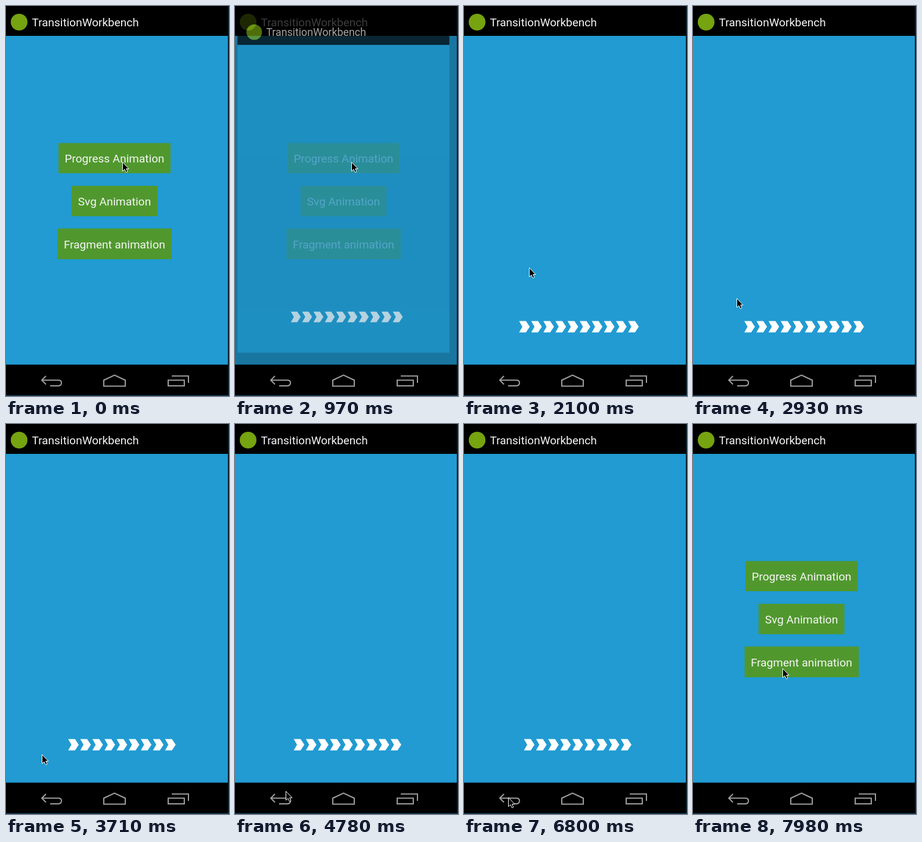
An HTML page that plays this animation: 374 px wide and 653 px high, repeating every 8000 ms.

```html
<!DOCTYPE html>
<html lang="en">
<head>
<meta charset="utf-8">
<title>TransitionWorkbench</title>
<style>
  html, body { margin: 0; height: 100%; overflow: hidden; background: #000; }
  svg { display: block; width: 100vw; height: 100vh; }
  text { font: 19px Roboto, sans-serif; fill: #f6f6f6; }
  .label { text-anchor: middle; }
  .icon { fill: none; stroke: #9d9d9d; stroke-width: 2; }
</style>
</head>
<body>
<svg viewBox="0 0 374 653">
  <defs>
    <g id="page">
      <path fill="#000" d="M-8-30H372V50H-8z"/>
      <path fill="#219bd2" d="M-8 50H372V601H-8z"/>
      <circle cx="22" cy="27" r="14" fill="#76a310"/>
      <text x="43.5" y="34">TransitionWorkbench</text>
    </g>
    <clipPath id="navClip"><path d="M0 601H372V651H0z"/></clipPath>
    <radialGradient id="halo">
      <stop offset=".86" stop-color="#fff"/>
      <stop offset=".88" stop-color="#fff" stop-opacity=".4"/>
      <stop offset="1" stop-color="#fff" stop-opacity="0"/>
    </radialGradient>
  </defs>

  <use href="#page"/>
  <g fill="#50982e">
    <path d="M88 229.500H276V280H88zM110 301H254V352H110zM86.500 372.500H278V424H86.500z"/>
    <text class="label" x="182" y="262">Progress Animation</text>
    <text class="label" x="182" y="334">Svg Animation</text>
    <text class="label" x="182" y="405.500">Fragment animation</text>
  </g>
  <path id="dim" d="M0 0H372V601H0z"/>

  <g id="front">
    <use href="#page"/>
    <g id="arrows" fill="#fff"></g>
  </g>

  <path d="M0 600.500H374V653H0z"/>
  <circle id="ripple" cx="77" cy="627" fill="url(#halo)" clip-path="url(#navClip)"/>
  <g class="icon" transform="translate(0 1)">
    <path id="back" d="M67 618.500L60 625.500L67 632.500M60 625.500H88Q93 625.500 93 630T88 635H74"/>
    <path d="M164 635.500V625.500L182 617L200 625.500V635.500z"/>
    <path d="M272 625.500H299V635H272zM278 618.500H306V630"/>
  </g>
  <path fill="#0a1e2a" d="M372 0H374V653H372z"/>
  <path fill="#123e55" d="M0 651.500H374V653H0z"/>
  <path id="cursor" d="M.5.5V15.500L4 12.500L6.500 17.700L9 16.500L6.700 11.500H11z" stroke="#fff" stroke-width="1"/>
</svg>

<script>
const LOOP = 8000, STEP = 59.4, PITCH = 20.32, SPEED = .0707;
const $ = id => document.getElementById(id);
const clamp = (v, lo, hi) => Math.min(Math.max(v, lo), hi);
const ramp = (t, from, to) => clamp((t - from) / (to - from), 0, 1);

function set(id, attributes) {
  for (const name in attributes) $(id).setAttribute(name, attributes[name]);
}

// The picture stands still after each mark, except in the runs.
const marks = [0, 500, 740, 970, 1090, 5790, 5960, 6500, 6800, 6970, 7150, 7390, 7630];
const runs = [1090, 5960, 7630];

function snap(t) {
  const start = marks.filter(m => m <= t).pop();
  return runs.includes(start) ? start + Math.floor((t - start) / STEP) * STEP : start;
}

// Key points: [time, value, ...]
const opening = [[500, .4], [740, .44], [970, .675], [1450, 1]];
const pointer = [[1270, 195, 261], [2100, 109, 438], [2580, 79, 479], [3410, 62, 508],
  [3710, 60, 554], [4240, 80, 568], [4780, 85, 615], [5400, 74, 625],
  [7571, 74, 625], [7920, 150, 409]];

function along(keys, t) {
  const next = clamp(keys.findIndex(k => k[0] > t), 1, keys.length - 1);
  const i = t >= keys[keys.length - 1][0] ? keys.length - 1 : next;
  const [a, b] = [keys[i - 1], keys[i]], f = ramp(t, a[0], b[0]);
  return a.slice(1).map((v, n) => v + (b[n + 1] - v) * f);
}

function presence(t) {
  if (t < 500 || t >= 7390) return 0;
  return t < 6970 ? along(opening, t)[0] : .675 - .075 * ramp(t, 6970, 7150);
}

const arrows = Array.from({ length: 11 }, () => {
  const p = document.createElementNS("http://www.w3.org/2000/svg", "path");
  p.setAttribute("d", "M0 0H11.500L17.800 9.500L11.500 19H0L5.500 9.500z");
  return $("arrows").appendChild(p);
});

function draw(t) {
  const shown = presence(t), scale = .8 + .2 * shown;
  set("front", {
    opacity: shown,
    transform: `translate(180 285) scale(${scale}) translate(-180 -285)`
  });
  set("dim", { opacity: t < 6800 ? ramp(t, 740, 1700) : 0 });

  // The row slides right; arrows exist only between the two limits.
  const phase = (SPEED * clamp(t, 1170, 6525) + 5.5) % PITCH;
  arrows.forEach((p, i) => {
    const x = 80.7 + phase + (i - 1) * PITCH;
    p.setAttribute("transform", `translate(${x} 527.5)`);
    p.setAttribute("visibility", x > 86 && x < 277 ? "visible" : "hidden");
  });

  const light = ramp(t, 5490, 5730) * (1 - ramp(t, 5960, 6450));
  set("ripple", { opacity: .22 * light, r: 60 + 10 * ramp(t, 5490, 5790) });
  const grey = 157 + 70 * light;
  $("back").style.stroke = `rgb(${grey},${grey},${grey})`;

  set("cursor", { transform: `translate(${along(pointer, t).join(" ")})` });
}

const begin = performance.now();
function tick() {
  draw(snap((performance.now() - begin) % LOOP));
  requestAnimationFrame(tick);
}
tick();
</script>
</body>
</html>
```
